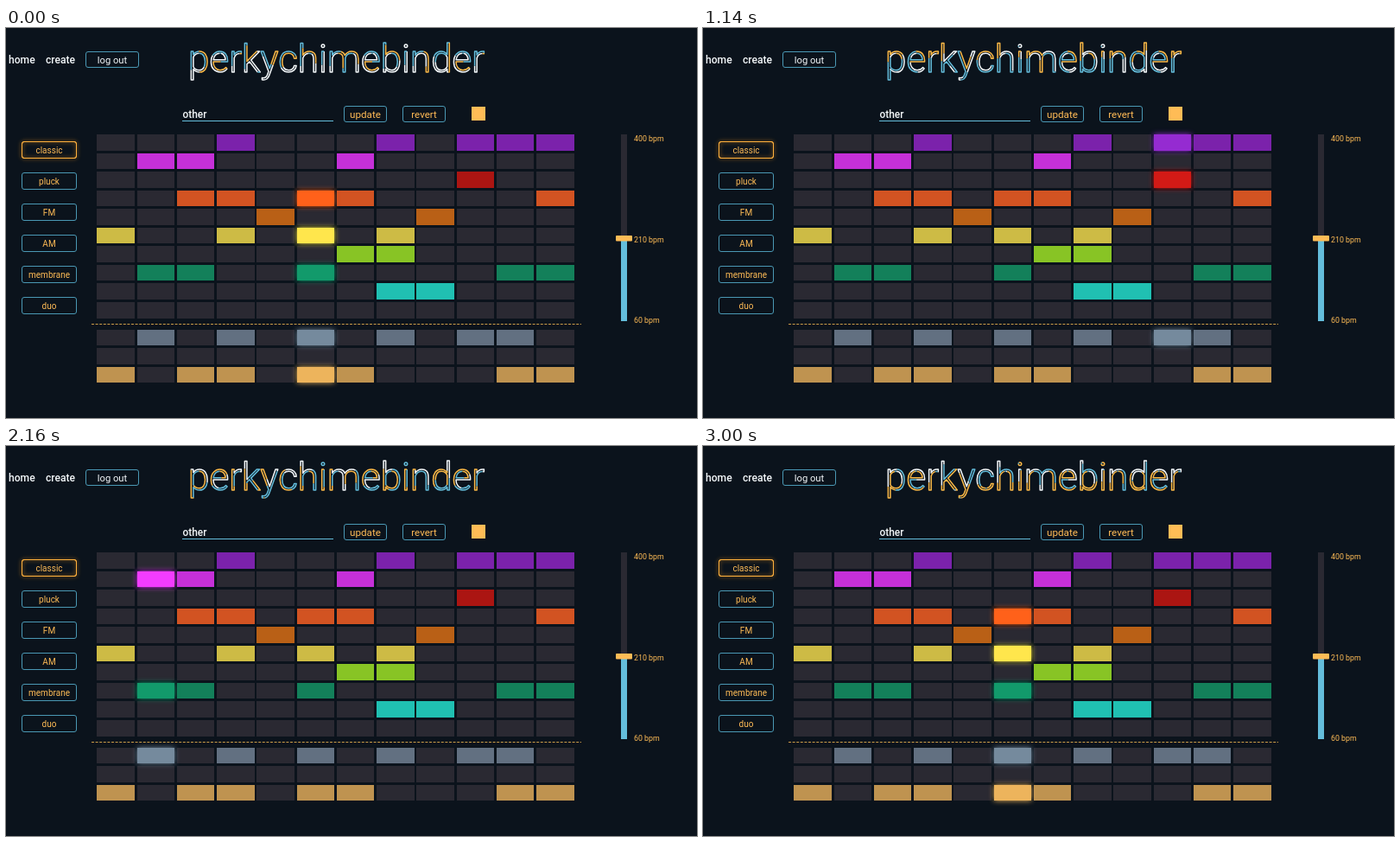
Animation of 800x451 px, one loop 3060 ms. Source, as an HTML page with a canvas:

```html
<!DOCTYPE html>
<html lang="en">
<head>
<meta charset="utf-8">
<title>perkychimebinder</title>
<style>
  html, body { margin: 0; width: 100%; height: 100%; overflow: hidden; background: #0b131c; }
  canvas { display: block; }
</style>
</head>
<body>
<canvas id="stage" width="800" height="451"></canvas>
<script>
const ctx = document.getElementById('stage').getContext('2d');
const LOOP = 3060, TICK = 60, COLS = 12;
const STEP = LOOP / COLS, PHASE = 112, FIRST_COL = 5;
const FONT = 'Roboto, "Liberation Sans", sans-serif';
const BG = '#0b131c', EMPTY = '#2a2932';
const AMBER = '#ffbc56', BLUE = '#64bddb', EDGE = '#4a98b4', WHITE = '#f4f8fa';

// Each row: idle colour, lit colour, filled columns
const rows = [
  ['#7b22ab', '#952bd1', [3, 7, 9, 10, 11]],
  ['#c530d8', '#f23cff', [1, 2, 6]],
  ['#ab1512', '#d31a16', [9]],
  ['#d25322', '#ff611a', [2, 3, 5, 6, 11]],
  ['#b96016', '#e3770f', [4, 8]],
  ['#cdbb45', '#ffe64c', [0, 3, 5, 7]],
  ['#88c425', '#a9ef20', [6, 7]],
  ['#13805a', '#129a6b', [1, 2, 5, 10, 11]],
  ['#20c0b2', '#17efd8', [7, 8]],
  [EMPTY, EMPTY, []],
  ['#627081', '#758a9d', [1, 3, 5, 7, 9, 10]],
  [EMPTY, EMPTY, []],
  ['#bf9350', '#edb45c', [0, 2, 3, 5, 6, 10, 11]]
];
const sounds = ['classic', 'pluck', 'FM', 'AM', 'membrane', 'duo'];

function glow(color, blur) {
  ctx.shadowColor = color;
  ctx.shadowBlur = blur;
}

function noGlow() {
  ctx.shadowColor = 'transparent';
  ctx.shadowBlur = 0;
}

function rect(x, y, w, h, color) {
  ctx.fillStyle = color;
  ctx.fillRect(x, y, w, h);
}

// Fills a box whose edges snap to whole pixels
function cell(x, y, color) {
  const left = Math.round(x), top = Math.round(y);
  rect(left, top, Math.round(x + 43.5) - left, Math.round(y + 18.6) - top, color);
}

function label(text, x, y, size, color, align = 'left', weight = 400) {
  ctx.font = `${weight} ${size}px ${FONT}`;
  ctx.textAlign = align;
  ctx.textBaseline = 'alphabetic';
  ctx.fillStyle = color;
  ctx.fillText(text, x, y);
}

function outline(x, y, w, h, color) {
  ctx.strokeStyle = color;
  ctx.lineWidth = 1;
  ctx.beginPath();
  ctx.roundRect(x + 0.5, y + 0.5, w, h, 2.5);
  ctx.stroke();
}

function button(text, x, y, w, h, size, color, edge = EDGE) {
  outline(x, y, w, h, edge);
  label(text, x + w / 2 + 0.5, y + h / 2 + 0.5 + size * 0.36, size, color, 'center');
}

// Outlined letters with three colours travelling along the contours
function drawTitle(t) {
  const seg = 35, shift = t / LOOP * seg * 2;
  ctx.font = `300 44px ${FONT}`;
  ctx.textAlign = 'left';
  ctx.textBaseline = 'alphabetic';
  ctx.lineWidth = 1.5;
  ctx.lineJoin = 'round';
  ctx.setLineDash([seg, seg * 2]);
  [WHITE, BLUE, '#fbb947'].forEach((color, i) => {
    ctx.strokeStyle = color;
    ctx.lineDashOffset = -i * seg + shift;
    ctx.strokeText('perkychimebinder', 211, 51);
  });
  ctx.setLineDash([]);
  ctx.lineDashOffset = 0;
}

function drawHeader() {
  label('home', 3, 41, 12.1, WHITE, 'left', 500);
  label('create', 46, 41, 12.1, WHITE, 'left', 500);
  button('log out', 92, 27, 61, 18, 11.2, WHITE);
  label('other', 204.5, 104, 11.9, WHITE, 'left', 500);
  rect(204, 107, 175, 1, BLUE);
  button('update', 391, 90, 49, 18, 11.7, AMBER);
  button('revert', 459, 90, 49, 18, 11.5, AMBER);
  rect(539, 91, 16, 16, AMBER);
}

function drawSounds() {
  glow('#ff9d1c', 5);
  outline(18, 131, 63, 19, '#ffb13d');
  noGlow();
  sounds.forEach((name, i) => {
    button(name, 18, 131 + i * 36, 63, 19, 10, AMBER, i ? EDGE : '#ffb13d');
  });
}

function drawGrid(active) {
  const lit = [];
  rows.forEach(([idle, bright, cols], r) => {
    const y = r < 10 ? 123 + r * 21.55 : 348.5 + (r - 10) * 21.6;
    for (let c = 0; c < COLS; c++) {
      const x = 105.3 + c * 46.25;
      const on = cols.includes(c);
      if (on && c === active) lit.push([x, y, bright]);
      else cell(x, y, on ? idle : EMPTY);
    }
  });
  lit.forEach(([x, y, color]) => {
    glow(color, 6);
    cell(x, y, color);
  });
  noGlow();

  ctx.strokeStyle = '#c99b48';
  ctx.lineWidth = 1;
  ctx.setLineDash([3, 1.6]);
  ctx.beginPath();
  ctx.moveTo(99, 342.5);
  ctx.lineTo(666, 342.5);
  ctx.stroke();
  ctx.setLineDash([]);
}

function drawTempo() {
  rect(712, 123, 7, 120, EMPTY);
  rect(712, 243, 7, 96, BLUE);
  ctx.fillStyle = AMBER;
  ctx.beginPath();
  ctx.roundRect(706, 240, 19, 6.5, 1);
  ctx.fill();
  label('400 bpm', 727, 131.3, 8.8, AMBER);
  label('210 bpm', 727, 248.3, 8.8, AMBER);
  label('60 bpm', 727, 341, 8.8, AMBER);
}

function frame() {
  const now = performance.now() % LOOP;
  const t = Math.floor(now / TICK) * TICK;
  const active = (FIRST_COL + Math.floor((t + PHASE) / STEP)) % COLS;
  rect(0, 0, 800, 451, BG);
  drawHeader();
  drawTitle(t);
  drawSounds();
  drawGrid(active);
  drawTempo();
  requestAnimationFrame(frame);
}
frame();
</script>
</body>
</html>
```
